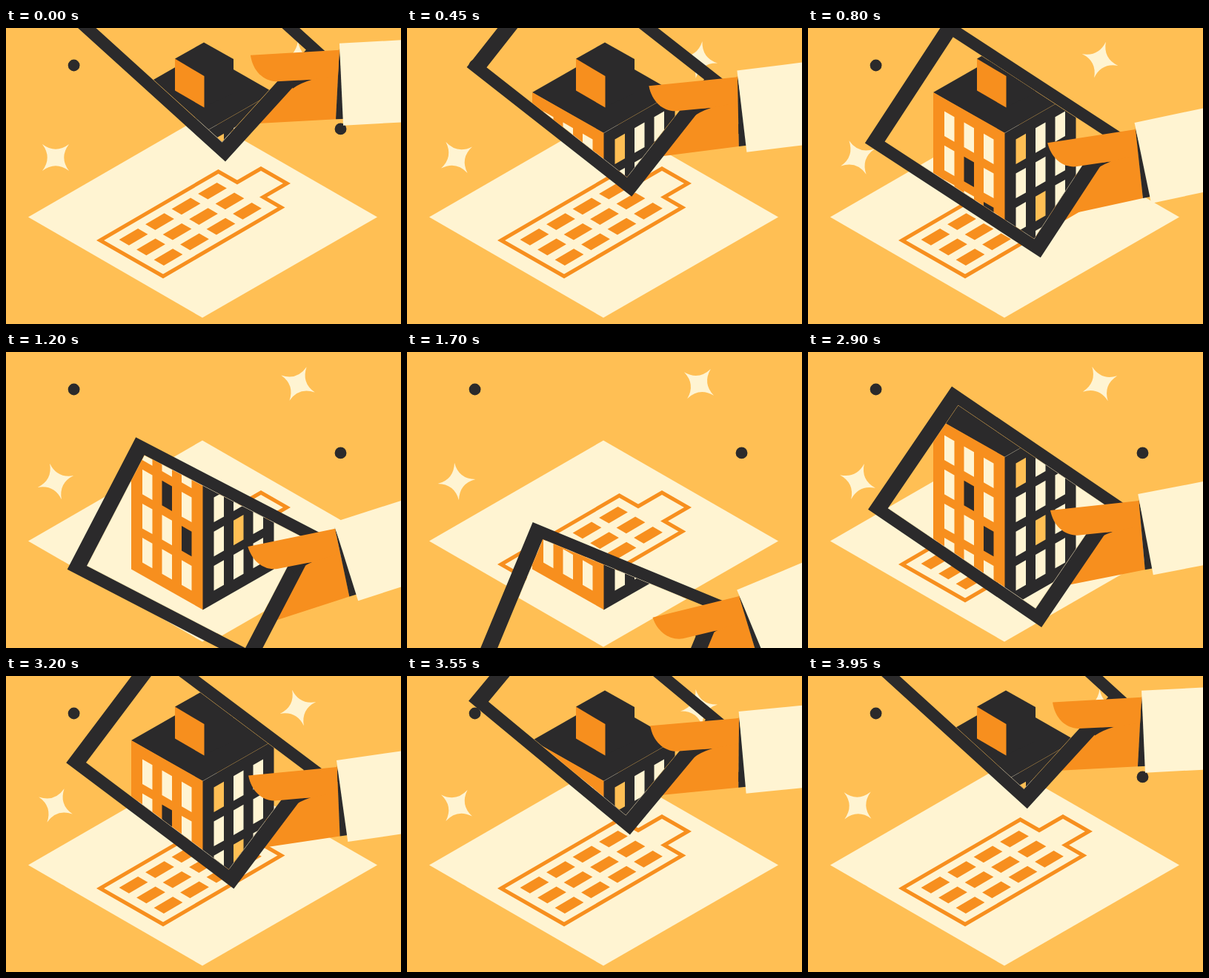
Write an HTML page that moves like this. It is 533 by 400 pixels and loops after 4000 ms.

```html
<!DOCTYPE html>
<html lang="en">
<head>
<meta charset="utf-8">
<title>Building preview</title>
<style>
  html, body { margin: 0; width: 100%; height: 100%; overflow: hidden; background: #ffbf54; }
  svg { display: block; width: 100vw; height: 100vh; }
  .bg { fill: #ffbf54; }
  .cream { fill: #fff4d2; }
  .orange { fill: #f78f1e; }
  .dark { fill: #2b2a2b; }
  .outline { fill: none; stroke: #f78f1e; stroke-width: 5; }
</style>
</head>
<body>
<svg viewBox="0 0 533 400">
  <defs>
    <clipPath id="screen">
      <rect class="tablet" x="-274" y="30.6" width="240.2" height="167.8"/>
    </clipPath>
  </defs>

  <rect class="bg" width="533" height="400"/>
  <path class="cream" d="M30 255.5L265 119.5L501 255.5L265 391.5Z"/>

  <g id="plan">
    <path class="outline" d="M127 287L286.500 194L312 208.500L344 190L379 210L347 228.500L371.500 242.500L212 335.500Z"/>
  </g>

  <!-- what the tablet screen reveals -->
  <g clip-path="url(#screen)">
    <rect class="bg" width="533" height="400"/>
    <path class="cream" d="M30 255.5L265 119.5L501 255.5V262.500L265 398.500L30 262.500Z"/>
    <path class="dark" d="M169 87L265 32L361 87L265 142Z"/>
    <path class="dark" d="M228 41.500L267 19.500L307 42V88L267 107Z"/>
    <path class="orange" d="M228 41.500L267.500 65V107.500L228 84.500Z"/>
    <g id="left"><path class="orange" d="M169 87L266 142V348.500L169 293.500Z"/></g>
    <g id="right" transform="translate(531 0) scale(-1 1)">
      <path class="dark" d="M169.500 87L265.500 142V348.500L169.500 293.500Z"/>
    </g>
  </g>

  <path class="cream star"/>
  <path class="cream star"/>
  <circle class="dark" cx="91.600" cy="50.500" r="7.900"/>
  <circle class="dark" cx="451.500" cy="136.400" r="7.900"/>

  <g class="arm">
    <path class="orange" d="M0 0L-20 4L-62 40L-115 99.500L-5 93.500Z"/>
    <path class="dark" d="M0 -2L-5 93.500L8 93Z"/>
  </g>
  <path class="dark tablet" fill-rule="evenodd"
    d="M-295.600 14.200H-12.600V215.200H-295.600Z M-274.400 30.200V198.800H-33.400V30.200Z"/>
  <g id="thumb">
    <path class="dark" d="M-37 40Q-54 45 -63 52L-68 41Z"/>
    <path class="orange" d="M0 0L-120 7C-117 28 -103 42 -85 42.500L-37 40L-2 35Z"/>
  </g>
  <path class="cream arm" d="M0 -9L200 -19V92L5 102Z"/>
</svg>
<script>
const LOOP = 4000, STEP = 50;
const TILT = 42.3;

// time, wrist x, wrist y, arm turn, thumb turn
const POSES = [
  [-25, 450, 29, 0, 0],
  [550, 445, 79, 5.3, 3],
  [800, 442, 137, 9.15, 5.4],
  [1250, 444.5, 250, 15.5, 8.5],
  [1700, 448.2, 330, 19.8, 10.5],
  [2050, 448.5, 337, 18.6, 8.6],
  [2500, 447, 287.5, 12.3, 4.4],
  [2900, 446.5, 201, 8.1, 2.9],
  [3300, 447, 99, 4.5, 1.9],
  [3550, 448, 57, 2.6, 1.5]
];

// x, y, starting angle
const STARS = [[67, 175, -45], [394, 43, 0]];

const all = s => [...document.querySelectorAll(s)];
const byId = id => document.getElementById(id);

function addPath(parent, cls, d) {
  const p = document.createElementNS("http://www.w3.org/2000/svg", "path");
  p.setAttribute("class", cls);
  p.setAttribute("d", d);
  parent.append(p);
}

function drawPlan() {
  for (let row = 0; row < 3; row++)
    for (let col = 0; col < 4; col++) {
      const x = 152.6 + col * 35.5 + row * 23.5;
      const y = 286 - col * 20.7 + row * 13.6;
      addPath(byId("plan"), "orange", `M${x} ${y}l25.500 -15l13.300 7.700l-25.500 15z`);
    }
}

// special: window keys "row,col" that take another colour
function drawWindows(face, special, cls) {
  for (let row = 0; row < 4; row++)
    for (let col = 0; col < 3; col++) {
      const x = 184 + col * 26.5;
      const y = 112.5 + col * 15.1 + row * 46.2;
      const fill = special.includes(row + "," + col) ? cls : "cream";
      addPath(face, fill, `M${x} ${y}l13.500 7.700v33.500l-13.500 -7.700z`);
    }
}

function starPath(r, c) {
  return `M0 ${-r}Q${c} ${-c} ${r} 0Q${c} ${c} 0 ${r}Q${-c} ${c} ${-r} 0Q${-c} ${-c} 0 ${-r}Z`;
}

// key pose at any index, wrapped around the loop
function key(i) {
  const n = POSES.length, lap = Math.floor(i / n);
  const [t, ...v] = POSES[i - lap * n];
  return [t + lap * LOOP, ...v];
}

function poseAt(t) {
  let i = 0;
  while (key(i + 1)[0] <= t) i++;
  const [a, b, c, d] = [key(i - 1), key(i), key(i + 1), key(i + 2)];
  const span = c[0] - b[0], u = (t - b[0]) / span;
  return [1, 2, 3, 4].map(k => {
    const m0 = (c[k] - a[k]) / (c[0] - a[0]) * span;
    const m1 = (d[k] - b[k]) / (d[0] - b[0]) * span;
    const rise = u * u * (3 - 2 * u);
    return b[k] + (c[k] - b[k]) * rise + m0 * u * (1 - u) ** 2 - m1 * u * u * (1 - u);
  });
}

drawPlan();
drawWindows(byId("left"), ["1,1", "2,2"], "dark");
drawWindows(byId("right"), ["0,2", "2,1"], "bg");

const stars = all(".star"), arms = all(".arm"), tablets = all(".tablet");
const thumb = byId("thumb");
stars.forEach(s => s.setAttribute("d", starPath(25.5, 3.2)));

function place(el, x, y, angle) {
  el.setAttribute("transform", `translate(${x} ${y}) rotate(${angle})`);
}

function render(t) {
  const [x, y, turn, bend] = poseAt(t);
  arms.forEach(el => place(el, x, y, -turn));
  tablets.forEach(el => place(el, x, y, TILT - turn));
  place(thumb, x, y, -bend);
  STARS.forEach(([sx, sy, from], i) => place(stars[i], sx, sy, from + 90 * t / LOOP));
}

const start = performance.now();
function tick(now) {
  const t = Math.max(0, now - start) % LOOP;
  render(Math.floor(t / STEP) * STEP);
  requestAnimationFrame(tick);
}
render(0);
requestAnimationFrame(tick);
</script>
</body>
</html>
```
